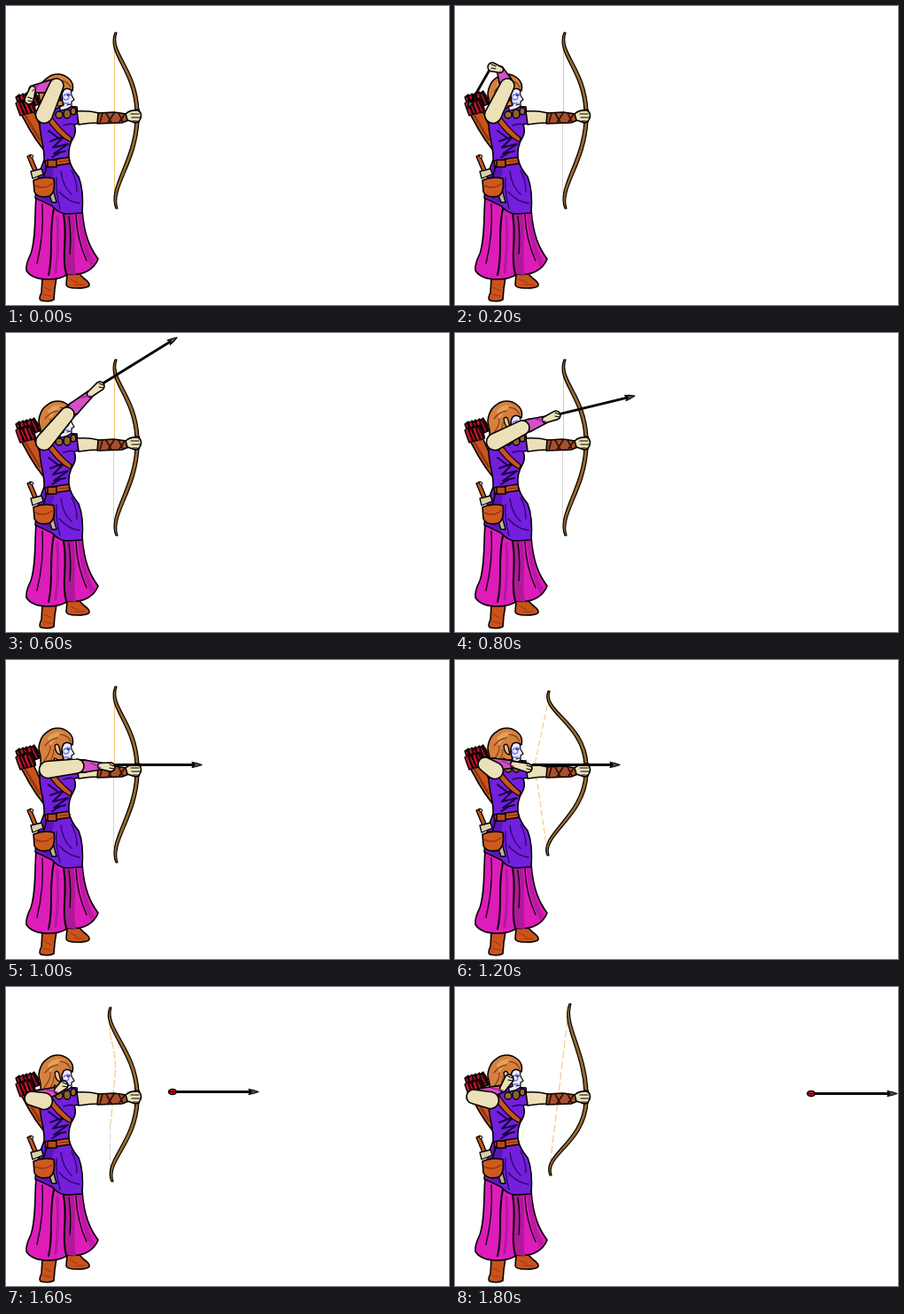
Write an HTML page with a canvas that moves like this. It is 500x338 px and loops after 2 s.

```html
<!DOCTYPE html>
<html lang="en">
<head>
<meta charset="utf-8">
<title>Archer</title>
<style>
html, body { margin: 0; width: 100%; height: 100%; overflow: hidden; background: #fff; }
canvas { display: block; }
</style>
</head>
<body>
<canvas id="stage" width="500" height="338"></canvas>
<script>
const ctx = document.getElementById('stage').getContext('2d');
ctx.lineJoin = ctx.lineCap = 'round';

const SKIN = '#ebe0b8', PINK = '#d44fc4', LEATHER = '#c9531b', WOOD = '#9c6a2a', HAIR = '#d5803e';
const STRING = '#f6c070', STEP = 200, LOOP = 2000;

function shape(d, fill, width = 1.6, stroke = '#000') {
  const path = new Path2D(d);
  if (fill) { ctx.fillStyle = fill; ctx.fill(path); }
  if (width) { ctx.lineWidth = width; ctx.strokeStyle = stroke; ctx.stroke(path); }
}
const line = (d, color = '#000', width = 1) => shape(d, null, width, color);

function dot(x, y, rx, ry, fill, width = 1) {
  shape(`M${x - rx},${y}a${rx},${ry} 0 1 0 ${2 * rx},0a${rx},${ry} 0 1 0 ${-2 * rx},0`, fill, width);
}

// Tapered limb with rounded ends, between two points of given radius
function limb([x1, y1], r1, [x2, y2], r2, fill) {
  const a = Math.atan2(y2 - y1, x2 - x1), q = Math.PI / 2;
  ctx.beginPath();
  ctx.arc(x1, y1, r1, a + q, a + 3 * q);
  ctx.arc(x2, y2, r2, a - q, a + q);
  ctx.closePath();
  ctx.fillStyle = fill;
  ctx.fill();
  ctx.lineWidth = 1.6;
  ctx.strokeStyle = '#000';
  ctx.stroke();
}

function quiver() {
  shape('M16,120L30,116L42,143L42,162Q34,152 27,140Z', LEATHER);
  line('M22,124L38,151', '#8e3614', 2.5);
  for (let i = 0; i < 9; i++) {
    const x = 11 + (i % 5) * 4.2, y = 106 - (i % 5) + (i > 4 ? 7 : 0);
    shape(`M${x},${y - 3}l4,-3l4,6l2,9l-5,2l-3,-8Z`, i % 2 ? '#a60c22' : '#270408', 1.3);
    line(`M${x + 2},${y - 2}l5,11`, '#d01833', 1.2);
  }
}

function body() {
  shape('M41,307L40,324Q36,332 40,333Q48,335 54,332L55,320L57,307Z', LEATHER);
  shape('M69,302L68,315Q68,319 80,319Q92,319 94,316Q95,313 88,308L82,302Z', LEATHER);
  line('M43,318l8,4M42,326l9,2M73,309l8,4M78,315l10,0', '#963812');

  shape('M34,215C32,240 34,262 28,280Q22,292 23,299Q29,309 48,309Q62,309 70,303Q83,305 93,299Q101,294 104,286C95,274 88,259 86,230Z', '#dd1cba');
  shape('M64,235C70,258 64,282 68,303L79,304C75,280 81,255 76,234Z', '#b0189a', 0);
  shape('M81,235C83,258 88,280 96,295L100,290C91,273 87,255 86,234Z', '#b81aa0', 0);
  line('M54,229C48,256 54,280 48,304M65,236C70,262 62,283 68,303', '#000', 2);
  line('M79,236Q80,264 91,288M71,238Q74,260 72,280M41,224Q43,258 35,291', '#000', 1.3);
  line('M58,238Q60,270 56,301', '#b018a0', 3);

  shape('M38,128C37,147 44,158 43,174C37,188 34,202 33,217Q44,222 52,226Q60,235 69,235L86,234Q88,208 82,193Q73,183 71,172Q70,158 76,149Q80,142 77,134L82,133L80,114L62,113Z', '#731fdd');
  shape('M43,180Q36,205 36,216Q45,221 52,224Q49,204 54,184Z', '#5b14b8', 0);
  line('M50,153L66,147L53,160L70,156L54,167L67,164M48,141L60,150M52,171L62,165', '#17043c', 2);
  line('M74,186Q80,197 80,210M62,187Q64,204 74,213M60,210Q71,222 83,223M57,194Q56,211 61,229', '#26065e', 1.3);
  line('M65,135Q73,132 77,134', '#26065e', 1.5);

  shape('M44,125L50,123Q61,139 74,149L73,154Q57,146 44,125Z', LEATHER, 1.3);
  shape('M44,175L71,171L72,178L45,182Z', LEATHER);
  shape('M47,174h10v8h-10Z', '#b9481a', 1.5);
  line('M60,176L70,175', '#792d0d');

  shape('M24,170L28,168L35,185L31,187Z', LEATHER, 1.3);
  dot(29, 170, 2, 1.5, '#d9cfa8');
  shape('M28,187L40,184L42,190L30,195Z', '#d9cfa8', 1.3);
  shape('M47,208L53,207L57,222L52,222Z', '#bdb293', 1.3);
  line('M46,181L42,195', '#000', 1.4);
  shape('M31,197Q42,192 54,195Q56,211 49,215Q36,218 32,210Z', '#cf591d');
  line('M33,203Q43,208 52,201', '#8d3814', 1.5);

  dot(60, 123, 4, 4, WOOD, 1.4);
  dot(69, 122, 4, 5, '#8a6426', 1.4);
  dot(76, 119, 3, 4, WOOD, 1.4);
}

function head() {
  shape('M61,92L73,93L74,101L77,106L74,108L74,113Q70,117 61,118Z', '#e9e9ff', 1.2);
  line('M65,102a3,3 0 1 1 3,4a4,4 0 0 1 -4,-3M69,99l4,1M65,110l6,0', '#7375dc', 1.3);
  line('M73,111l-4,1M69,101l3,0');
  shape('M37,127Q41,115 38,105C35,97 40,85 47,81C53,76 63,75 71,82Q77,87 75,96Q69,91 65,95Q61,101 65,112Q60,115 55,111Q50,122 44,129Z', HAIR);
  shape('M47,88Q54,80 64,82Q55,88 50,97Z', '#e2a25c', 0);
  line('M44,97Q50,89 58,88M43,114Q51,104 50,97M61,84Q70,85 73,92M48,117Q54,109 54,101', '#8f4517', 1.3);
  shape('M55,97Q58,93 60,98L62,107Q56,107 55,97Z', '#e6bd8d', 1.3);
}

function bowLimb([x, y], sign) {
  const end = 124 - sign * 5;
  shape(`M${x + 1},${y}C${x - 7},${y + sign * 23} 148,${124 - sign * 54} 150,${end}
    L146,${end}C144,${124 - sign * 52} ${x - 11},${y + sign * 24} ${x - 1},${y}Z`, WOOD, 1.2);
}

function bow({ top, bottom, string, dash = [] }) {
  ctx.setLineDash(dash);
  line(string[0], STRING, 1);
  if (string[1]) line(string[1], '#d4d4d4', 1);
  ctx.setLineDash([]);
  bowLimb(top, 1);
  bowLimb(bottom, -1);
  shape('M145.5,117h5v14h-5Z', '#744715', 1.2);
}

function bowArm() {
  shape('M80,119Q93,118 105,121L105,132Q94,132 82,134Z', SKIN);
  shape('M104,121L122,120L136,122L141,128L131,132L103,133Z', '#a5512f');
  line('M109,121L106,132M113,121L119,132M122,121L115,132M127,121L132,131M134,122L128,131', '#2c0c04', 1.6);
  shape('M135,122Q140,117 149,118Q154,121 152,127Q149,134 143,131L137,129Z', SKIN);
  line('M141,122L150,122M142,126L152,126M143,130L148,130', '#000', 1.2);
}

function arrow([x1, y1, x2, y2], flying) {
  const length = Math.hypot(x2 - x1, y2 - y1);
  ctx.save();
  ctx.translate(x1, y1);
  ctx.rotate(Math.atan2(y2 - y1, x2 - x1));
  line(`M2,0H${length - 8}`, '#000', 2.8);
  shape(`M${length - 11},-3L${length - 6},-2L${length},0L${length - 6},2L${length - 11},3L${length - 8},0Z`, '#555', 1.2);
  if (flying) {
    dot(5, 0, 4.5, 3, '#c2142e', 1.4);
    line('M2,0H9');
  }
  ctx.restore();
}

function drawArm([shoulder, elbow, wrist, hand]) {
  const along = t => elbow.map((v, i) => v + (wrist[i] - v) * t);
  const cuff = along(0.3), fold = along(0.65);
  limb(elbow, 7.5, cuff, 7, SKIN);
  limb(cuff, 7, wrist, 4, PINK);
  limb(shoulder, 9.5, elbow, 8, SKIN);
  limb(wrist, 3.5, hand, 5, SKIN);
  const [x, y] = hand;
  line(`M${x - 1},${y - 3}l5,2M${x - 1},${y + 1}l5,1`, '#000', 1.2);
  line(`M${fold[0] - 2},${fold[1] - 4}L${wrist[0]},${wrist[1] + 2}`, '#8b2780', 1.3);
}

const rest = { top: [124, 30], bottom: [125, 229], string: ['M122.5,46V125', 'M121.5,125V212'] };
const loose = { top: [118, 23], bottom: [120, 220], dash: [8, 3], string: ['M117,40Q117,55 121,68Q125,88 122,111Q120,135 118,155', 'M117.5,155V207'] };
const swung = { top: [130, 19], bottom: [108, 213], dash: [8, 4], string: ['M127,37L108,195'] };
const drawn = { top: [106, 35], bottom: [105, 221], dash: [6, 4], string: ['M104,52L90,118L103,210'] };

// arm: shoulder, elbow, wrist, hand; arrow: tail to tip
const poses = [
  { bow: { ...rest, string: ['M122.5,46V212'] }, arm: [[43, 123], [57, 90], [30, 94], [26, 106]] },
  { bow: rest, arm: [[43, 123], [59, 90], [51, 72], [42, 69]], arrow: [42, 67, 14, 116] },
  { bow: rest, arm: [[43, 123], [60, 90], [73, 56], [68, 43]], arrow: [64, 37, 3, 113] },
  { bow: rest, arm: [[43, 123], [69, 92], [95, 69], [106, 60]], arrow: [106, 59, 193, 5] },
  { bow: rest, arm: [[45, 123], [76, 107], [102, 98], [114, 93]], arrow: [112, 93, 203, 71] },
  { bow: rest, arm: [[47, 124], [80, 120], [107, 120], [118, 121]], arrow: [122, 118.5, 221, 118.5] },
  { bow: drawn, arm: [[45, 125], [34, 118], [66, 118], [82, 122]], arrow: [86, 118.5, 186, 118.5] },
  { bow: { ...rest, top: [124, 29], bottom: [124, 232] }, arm: [[46, 129], [29, 122], [60, 117], [72, 118]], arrow: [142, 118.5, 244, 118.5], flying: true },
  { bow: loose, arm: [[43, 129], [29, 126], [58, 117], [65, 111]], arrow: [183, 118.5, 285, 118.5], flying: true },
  { bow: swung, arm: [[40, 128], [21, 124], [54, 115], [61, 104]], arrow: [397, 120.5, 499, 120.5], flying: true }
];

function draw(pose) {
  ctx.fillStyle = '#fff';
  ctx.fillRect(0, 0, 500, 338);
  quiver();
  body();
  head();
  bow(pose.bow);
  bowArm();
  if (pose.arrow) arrow(pose.arrow, pose.flying);
  drawArm(pose.arm);
}

let shown = -1;
function tick() {
  const index = Math.floor((performance.now() % LOOP) / STEP);
  if (index !== shown) draw(poses[shown = index]);
  requestAnimationFrame(tick);
}
tick();
</script>
</body>
</html>
```
